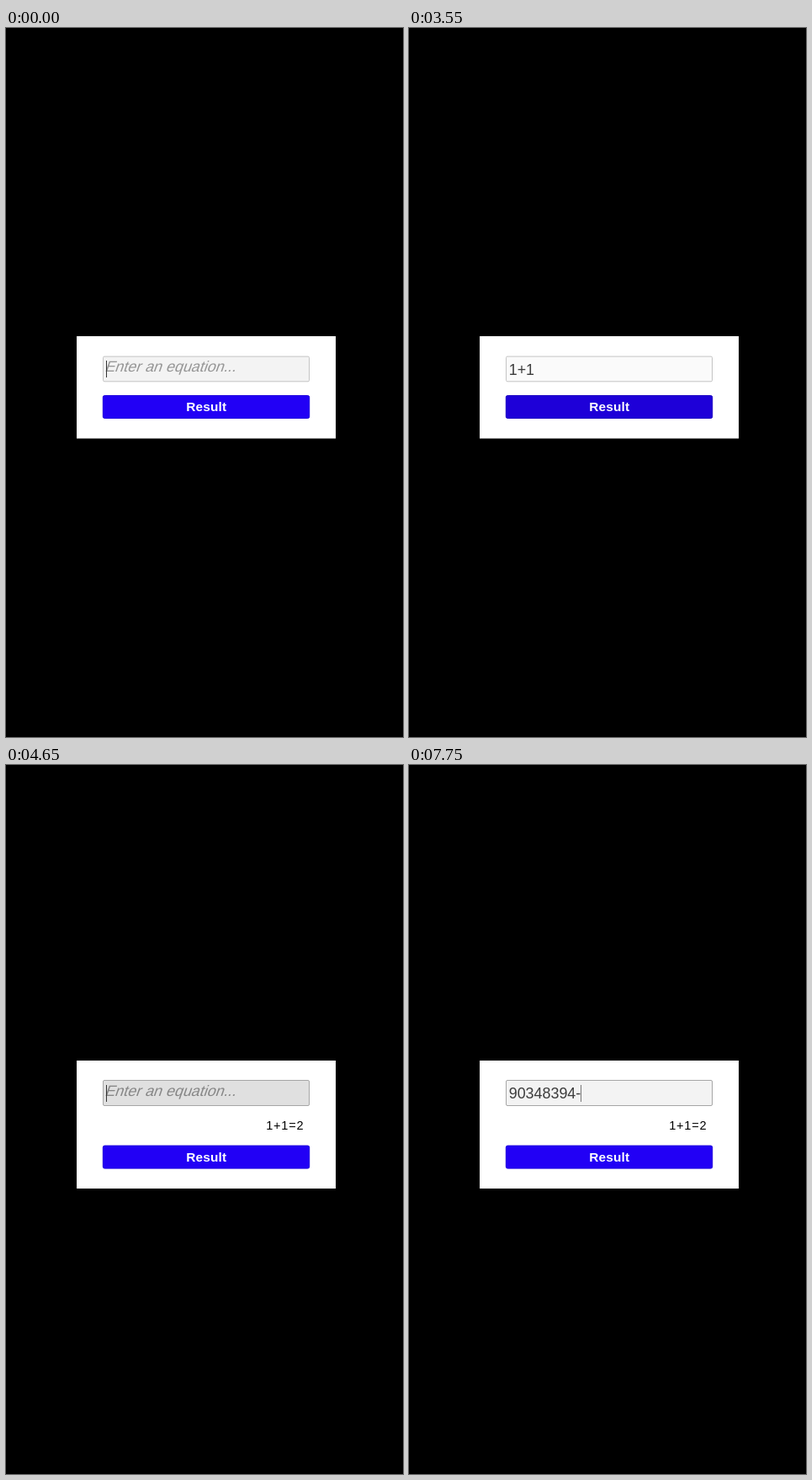
Write an HTML page with a canvas that moves like this. It is 472 by 842 pixels and loops after 8 s.

```html
<!DOCTYPE html>
<html lang="en">
<head>
<meta charset="utf-8">
<style>
  html, body { margin: 0; width: 100%; height: 100%; overflow: hidden; background: #000; }
  canvas { display: block; }
</style>
</head>
<body>
<canvas id="stage" width="472" height="842"></canvas>
<script>
const ctx = document.getElementById('stage').getContext('2d');
const FAMILY = '"Liberation Sans", Arial, sans-serif';
const INPUT_FONT = '17.9px';
const LOOP = 8000, STEP = 50, BLINK = 600;
const BLUR = 3450, SOLVE = 3600, FOCUS = 4650;

const press = (ch, at) => ({ ch, at });
const keys = [
  press('1', 950), press('+', 1150), press('1', 1700),
  ...[...'90348394'].map((ch, i) => press(ch, 6550 + i * 42)),
  press('-', 7750)
];

// Rises linearly from 0 to 1 between two times.
const ramp = (t, from, to) => Math.min(1, Math.max(0, (t - from) / (to - from)));

function box(x, y, w, h, radius, fill, edge) {
  ctx.beginPath();
  ctx.roundRect(x, y, w, h, radius);
  ctx.fillStyle = fill;
  ctx.fill();
  ctx.strokeStyle = edge;
  ctx.stroke();
}

function label(str, x, y, font, color, spacing = 0) {
  ctx.font = `${font} ${FAMILY}`;
  ctx.letterSpacing = spacing + 'px';
  ctx.fillStyle = color;
  ctx.fillText(str, x, y);
}

function drawPlaceholder(baseline, color) {
  ctx.save();
  ctx.transform(1, 0, -0.35, 1, 116.9, baseline);
  label('Enter an equation...', 0, 0, INPUT_FONT, color);
  ctx.restore();
}

function drawCaret(t, text, lastPress, top) {
  const start = Math.max(lastPress, t >= FOCUS ? FOCUS : -400);
  const focused = t < BLUR || t >= FOCUS;
  if (!focused || Math.floor((t - start) / BLINK) % 2) return;
  ctx.font = `${INPUT_FONT} ${FAMILY}`;
  ctx.letterSpacing = '0px';
  ctx.fillStyle = text ? '#777' : '#323232';
  ctx.fillRect(Math.floor(119 + ctx.measureText(text).width), Math.round(top + 5.6), 1, 20);
}

function drawField(t, top, height, edge) {
  const pressed = ramp(t, 4600, 4700) - ramp(t, 4700, 4850);
  const selected = 1 - ramp(t, 3400, 3650) + ramp(t, 4600, 4650);
  const level = Math.round(255 - 12 * selected - 38 * pressed);
  box(115.5, top + 0.5, 245, height, 1.5, `rgb(${level},${level},${level})`, edge);

  const pressedKeys = keys.filter(k => k.at <= t);
  const text = pressedKeys.filter(k => (k.at > SOLVE) === (t >= SOLVE)).map(k => k.ch).join('');
  if (text) label(text, 118.7, top + 22, INPUT_FONT, '#3c3c3c');
  else drawPlaceholder(top + 18.6, pressed > 0 ? '#868686' : '#969696');
  drawCaret(t, text, pressedKeys.at(-1)?.at ?? -400, top);
}

function drawButton(t, top) {
  const light = 1 - 0.12 * (ramp(t, BLUR, 3550) - ramp(t, SOLVE, 3700));
  const blue = k => `rgb(${Math.round(34 * k)},0,${Math.round(245 * k)})`;
  box(115.3, top + 0.5, 245.4, 27, 2, blue(light), blue(light * 0.9));
  ctx.textAlign = 'center';
  label('Result', 238.3, top + 19.4, 'bold 15.4px', '#fff', 0.2);
  ctx.textAlign = 'left';
}

function draw(t) {
  const solved = t >= SOLVE;
  const panelHeight = solved ? 152 : 121.5;
  ctx.fillStyle = '#000';
  ctx.fillRect(0, 0, 472, 842);
  ctx.fillStyle = '#fff';
  ctx.fillRect(84, solved ? 351 : 366, 308, panelHeight);

  if (solved) {
    drawField(t, 374, 30, '#a6a6a6');
    label('1+1=2', 309.2, 433, '14.5px', '#000', 0.8);
  } else {
    drawField(t, 389.6, 29.7, '#c4c4c4');
  }
  drawButton(t, solved ? 451.6 : 436);
}

function tick() {
  const t = performance.now() % LOOP;
  draw(Math.floor(t / STEP) * STEP);
  requestAnimationFrame(tick);
}
tick();
</script>
</body>
</html>
```
